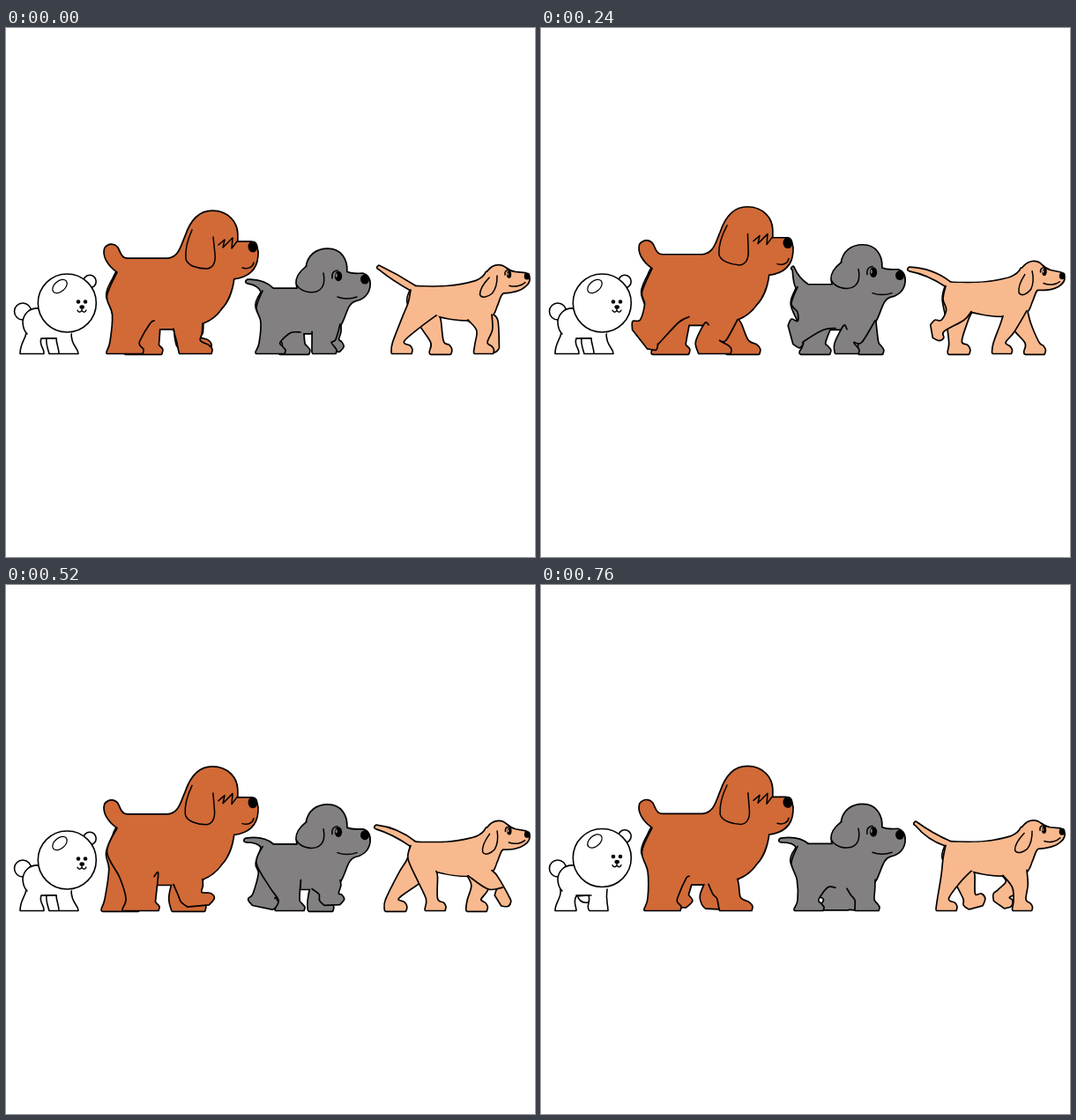
An HTML page with a canvas that plays this animation: 600x600 px, repeating every 0.8 s.

```html
<!DOCTYPE html>
<html lang="en">
<head>
<meta charset="utf-8">
<title>Dog walk</title>
<style>
html, body { margin: 0; width: 100%; height: 100%; overflow: hidden; background: #fff; }
canvas { display: block; width: 600px; height: 600px; }
</style>
</head>
<body>
<canvas id="stage" width="600" height="600"></canvas>
<script>
const ctx = document.getElementById('stage').getContext('2d');
const LOOP = 800, HALF = 400, STEP = 40, GROUND = 369.5;
const KEYS = [40, 120, 160, 240, 320, 360];
const keyTime = i => KEYS[i % 6] + HALF * Math.floor(i / 6);

// Value of a cyclic track: 6 keys span half a loop, 12 keys a whole one.
function at(track, t) {
  const n = track.length, span = n / 6 * HALF;
  t = 40 + (((t - 40) % span) + span) % span;
  let i = n - 1;
  while (keyTime(i) > t) i--;
  const f = (t - keyTime(i)) / (keyTime(i + 1) - keyTime(i));
  return track[i] + (track[(i + 1) % n] - track[i]) * f;
}

// Leg: x per key; `air` lists [y, tilt in degrees] from key `lift` on.
function limb(o) {
  o.y = Array(12).fill(GROUND);
  o.a = Array(12).fill(0);
  o.air.forEach(([y, a], i) => { o.y[o.lift + i] = y; o.a[o.lift + i] = a; });
  return o;
}

const dogs = [
  {
    color: '#d16a37',
    body: 'M126 276C115 268 110 258 112.5 250C117 244 125 245 127.5 252C130 258 132 262 138 262L183 262C197 261 199 247 204 236C210 218 220 208 234 208C252 208 262 221 262 234L262 243L278 243C284 245 286 252 285 259C284 273 275 282 258 284C256 300 250 312 244 318C238 327 230 332 222 335L215 341L165 341C150 345 130 342 124 330C118 318 116 292 126 276Z',
    ear: 'M211 229C206 240 203 252 204 262C206 270 218 273 228 273C236 272 238 264 237 256L235 237',
    earAt: [222, 230], earSwing: bob => -bob * .016,
    lines: 'M241 246L248 240L246 249L257 238L256 250L262 242M268 272C275 274 280 271 281 266',
    nose: [280, 248, 5.5, 6.5],
    hind: limb({ top: [[126, 277], [114.5, 304]], end: [168, 332], w: 21, h: 14, n: 17, off: 0, k: 22, len: 54,
      x: [156, 153, 152, 147, 143, 138, 135, 130, 122, 112, 132, 150],
      lift: 8, air: [[367, 3], [353, 52], [361, 18], [365, 0]] }),
    fore: limb({ top: [[190, 341]], end: [223, 335], w: 19, h: 14, n: 13.5, off: -8, k: 15.5, len: 15,
      x: [215, 207, 200, 197, 198, 202, 213, 218, 230, 229, 226, 221],
      lift: 5, air: [[367, 3], [366, 3], [364, -5], [358, -35]] })
  },
  {
    color: '#828080',
    body: 'M290 297L300 296L331 296C328 285 333 278 341 271C343 258 352 251 365 251C379 251 387 262 386 277C393 280 398 279 405 279C411 281 413 287 412 294C410 304 402 308 396 309C388 311 386 322 382 331C378 342 370 346 360 346L320 346C300 348 292 340 291 332C288 322 288 308 290 297Z',
    tail: { x: [273, 271, 272, 285, 284, 271], y: [287, 289, 284, 272, 274, 289], a: [303, 296], b: [290, 299],
      bend: () => [289, 286] },
    ear: 'M341 270C333 276 328 282 329 290C333 299 345 301 352 299C360 296 362 288 360 278',
    earAt: [350, 270], earSwing: () => 0,
    lines: 'M376 305C384 308 392 307 398 305M370 284C369 278 372 275 376 275',
    nose: [407, 285, 5, 5.5], eye: [377, 281.5, 4.2, 5.8],
    hind: limb({ top: [[291, 298], [284, 317]], end: [334, 345], w: 17, h: 12, n: 12, off: -1, k: 18, len: 37,
      x: [327, 322, 315, 311, 306, 304, 300, 291, 285, 283, 306, 334],
      lift: 7, air: [[365, 12], [357, 52], [348, 75], [360, 20], [368, 0]] }),
    fore: limb({ top: [[347, 346]], end: [379, 336], w: 14, h: 12, n: 11, off: -3, k: 14, len: 15,
      x: [361, 357, 354, 347, 345, 345, 368, 370, 378, 374, 372, 370],
      lift: 5, air: [[367, 5], [366, 3], [363, -3], [357, -15]] })
  },
  {
    color: '#f9b98e',
    body: 'M459 293C475 294 500 294 512 292C530 289 540 287 545 277L562 280L564 300C560 302 559 310 556 316C554 324 548 333 540 333L524 331C510 331 500 329 488 326C484 335 470 340 464 330C459 320 461 305 459 293Z',
    head: 'M545 279C550 269 560 267 566 272C570 275 572 276 577 277L589 278C595 281 594 287 590 291C583 298 574 299 564 300L552 298Z',
    headAt: [556, 285], nod: p => .07 * (1 - Math.cos(p)),
    tail: { x: [422, 419, 417, 417, 419, 424], y: [271, 274, 276, 273, 272, 270], a: [464, 293], b: [459, 297],
      bend: x => [441, 274 + 1.4 * (x - 417)] },
    ear: 'M548 283C541 290 537 297 537 302C539 307 546 305 551 301C555 296 557 288 557 281',
    earAt: [553, 280], earSwing: (bob, p) => -.12 * (1 - Math.cos(p)),
    lines: 'M571 292C578 294 585 292 589 288M566 280C565 275 569 273 572 276',
    nose: [591, 281, 3.4, 4], eye: [570.5, 279.5, 2.6, 4],
    hind: limb({ top: [[459, 297], [456, 312]], end: [488, 326], w: 12, h: 13, n: 6.5, off: -4, k: 11.5, len: 46,
      x: [493, 487, 480, 474, 468, 460, 449, 442, 434, 443, 467, 493],
      lift: 8, air: [[351, 80], [344, 80], [359, 15], [365, -15]] }),
    fore: limb({ top: [[524, 331]], end: [551, 325], w: 11.5, h: 12, n: 7, off: -3, k: 9, len: 37,
      x: [542, 534, 529, 523, 519, 520, 545, 558, 562, 560, 554, 546],
      lift: 5, air: [[362, 35], [357, 80], [358, 58], [364, 28]] })
  }
];

for (const d of dogs) {
  for (const k of ['body', 'head', 'ear', 'lines']) if (d[k]) d[k] = new Path2D(d[k]);
}

// Smooth curve through points, continuing from the first one.
function curve(path, pts) {
  const p = i => pts[Math.max(0, Math.min(pts.length - 1, i))];
  for (let i = 0; i < pts.length - 1; i++) {
    const [a, b, c, d] = [p(i - 1), p(i), p(i + 1), p(i + 2)];
    path.bezierCurveTo(b[0] + (c[0] - a[0]) / 6, b[1] + (c[1] - a[1]) / 6,
      c[0] - (d[0] - b[0]) / 6, c[1] - (d[1] - b[1]) / 6, c[0], c[1]);
  }
}

function legPath(l, t, bob) {
  const px = at(l.x, t), py = at(l.y, t), a = at(l.a, t) * Math.PI / 180;
  const c = Math.cos(a), s = Math.sin(a);
  const paw = (x, y) => [px + x * c - y * s, py + x * s + y * c];
  const top = l.top.map(([x, y]) => [x, y + bob]), end = [l.end[0], l.end[1] + bob];
  const hip = [(top[0][0] + end[0]) / 2, (top[0][1] + end[1]) / 2];
  const ankle = paw(l.off, -l.h);
  const dx = ankle[0] - hip[0], dy = ankle[1] - hip[1], d = Math.hypot(dx, dy) || 1;
  const nx = dy / d, ny = -dx / d;
  const push = Math.max(0, l.len - d) * .6;
  const knee = r => [hip[0] + dx / 2 + nx * (push + r), hip[1] + dy / 2 + ny * (push + r)];
  // Paws are flat on the ground and rounder in the air.
  const round = Math.min(1, (GROUND - py) / 5), inset = 1 + l.w * .3 * round;
  const toe = paw(l.w - inset, 0);
  const path = new Path2D();
  path.moveTo(...top[0]);
  curve(path, [...top, knee(-l.k), paw(l.off - l.n, -l.h), paw(-l.w, -2 - l.h * .3 * round), paw(inset - l.w, 0)]);
  path.lineTo(...toe);
  curve(path, [toe, paw(l.w, -l.h * (.35 + .15 * round)), paw(l.w * .8, -l.h * (.7 + .25 * round)),
    paw(l.off + l.n, -l.h - 1), knee(l.k), end]);
  return path;
}

function tailPath(tail, t, bob) {
  const x = at(tail.x, t), y = at(tail.y, t), [cx, cy] = tail.bend(x);
  const path = new Path2D();
  path.moveTo(tail.a[0], tail.a[1] + bob);
  path.quadraticCurveTo(cx + 3, cy - 1, x + 1, y - 1);
  path.quadraticCurveTo(x - 2, y + 1, x + 1, y + 2);
  path.quadraticCurveTo(cx - 2, cy + 5, tail.b[0], tail.b[1] + bob);
  return path;
}

function blob(x, y, rx, ry = rx, color = '#000', turn = 0) {
  ctx.beginPath();
  ctx.ellipse(x, y, rx, ry, turn, 0, 7);
  ctx.fillStyle = color;
  ctx.fill();
}

const spin = ([x, y], rad, dy) =>
  new DOMMatrix().translate(x, y + dy).rotate(rad * 180 / Math.PI).translate(-x, -y);

function placed(path, matrix) {
  const copy = new Path2D();
  copy.addPath(path, matrix);
  return copy;
}

function drawDog(d, t) {
  const p = t / HALF * 2 * Math.PI;
  const bob = -2.2 * (1 - Math.cos((t - 45) / HALF * 2 * Math.PI));
  const headPose = spin(d.headAt || d.earAt, d.nod ? d.nod(p) : 0, bob);
  const back = [legPath(d.hind, t, bob), legPath(d.fore, t + HALF, bob),
    placed(d.body, spin([0, 0], 0, bob))];
  if (d.head) back.push(placed(d.head, headPose));
  if (d.tail) back.push(tailPath(d.tail, t, bob));

  // Far legs, tail, head and body share one outline.
  ctx.lineWidth = 3.4;
  back.forEach(s => ctx.stroke(s));
  ctx.fillStyle = d.color;
  back.forEach(s => ctx.fill(s));

  ctx.lineWidth = 1.7;
  for (const leg of [legPath(d.hind, t + HALF, bob), legPath(d.fore, t, bob)]) {
    ctx.fill(leg);
    ctx.stroke(leg);
  }

  ctx.lineWidth = 1.5;
  ctx.setTransform(headPose);
  blob(...d.nose);
  if (d.eye) {
    const [x, y, rx, ry] = d.eye;
    blob(...d.eye);
    blob(x - rx * .55, y - ry * .15, rx * .25, ry * .4, d.color);
  }
  ctx.stroke(d.lines);
  ctx.setTransform(spin(d.earAt, d.earSwing(bob, p), bob));
  ctx.fillStyle = d.color;
  ctx.fill(d.ear);
  ctx.stroke(d.ear);
  ctx.resetTransform();
}

// Small white dog: four held poses, three strides per loop.
const poses = [
  { until: 3, head: 0, legs: 'M23 346C21 355 16 358 16 369.5L43 369.5C44 363 37 361 40 352L46 352C45 358 47 362 49 369.5L82 369.5C82 362 74 362 74 346M57 352C57 358 60 363 60 369.5M40 352L57 352' },
  { until: 7, head: 2, legs: 'M23 346C22 355 16 358 16 369.5L49 369.5C49 364 44 362 46 353L53 353C57 360 51 362 51 369.5L75 369.5C75 362 73 358 75 346M41 350C37 356 38 364 38 369.5M46 353L36 369.5' },
  { until: 15, head: -1, legs: 'M24 344C31 352 28 357 23 362C21 365 22 369.5 24 369.5L45 369.5C45 362 38 364 40 355L42 350L54 351C56 359 49 360 49 369.5L82 369.5C83 362 72 360 74 346M70 349C68 358 70 362 76 369.5' },
  { until: 18, head: -2.5, legs: 'M22 345C24 355 16 359 16 369.5L40 369.5C40 363 36 360 40 353L54 352C57 360 50 364 55 369.5L76 369.5C76 361 73 358 75 345M41 351C43 359 47 361 53 360' }
];
poses.forEach(p => p.legs = new Path2D(p.legs));
const rump = new Path2D('M37 318C27 317 20 324 19 333C19 340 21 344 24 347L40 352L74 347L74 318Z');
const rumpLine = new Path2D('M37 318C27 317 20 324 19 333C19 340 21 344 24 347M40 352L57 352');
const whiteFace = new Path2D('M86 317L86 320C85 323 82 323 81 320M86 320C87 323 90 323 91 320');

function ring(x, y, rx, ry = rx, turn = 0) {
  blob(x, y, rx, ry, '#fff', turn);
  ctx.stroke();
}

function drawWhite(i) {
  const s = i * 3 % 20, pose = poses.find(p => s < p.until) || poses[0];
  ctx.lineWidth = 1.6;
  ring(19, 321.5, 9.5);
  ctx.fillStyle = '#fff';
  ctx.fill(pose.legs);
  ctx.stroke(pose.legs);
  ctx.fill(rump);
  ctx.stroke(rumpLine);
  ctx.save();
  ctx.translate(0, pose.head);
  ring(95, 287.5, 7.2);
  ring(69.3, 312, 33);
  ctx.lineWidth = 1.3;
  ring(61, 293, 9.5, 6, -.7);
  blob(82, 310.5, 2.3);
  blob(90, 310.5, 2.3);
  blob(86.2, 316.5, 2.8, 2.2);
  ctx.stroke(whiteFace);
  ctx.restore();
}

function frame() {
  let i = Math.floor(performance.now() % LOOP / STEP);
  if (i === 1) i = 0; // first pose is held twice as long
  ctx.fillStyle = '#fff';
  ctx.fillRect(0, 0, 600, 600);
  ctx.strokeStyle = '#000';
  ctx.lineJoin = ctx.lineCap = 'round';
  drawWhite(i);
  dogs.forEach(d => drawDog(d, Math.max(STEP, i * STEP)));
  requestAnimationFrame(frame);
}
frame();
</script>
</body>
</html>
```
